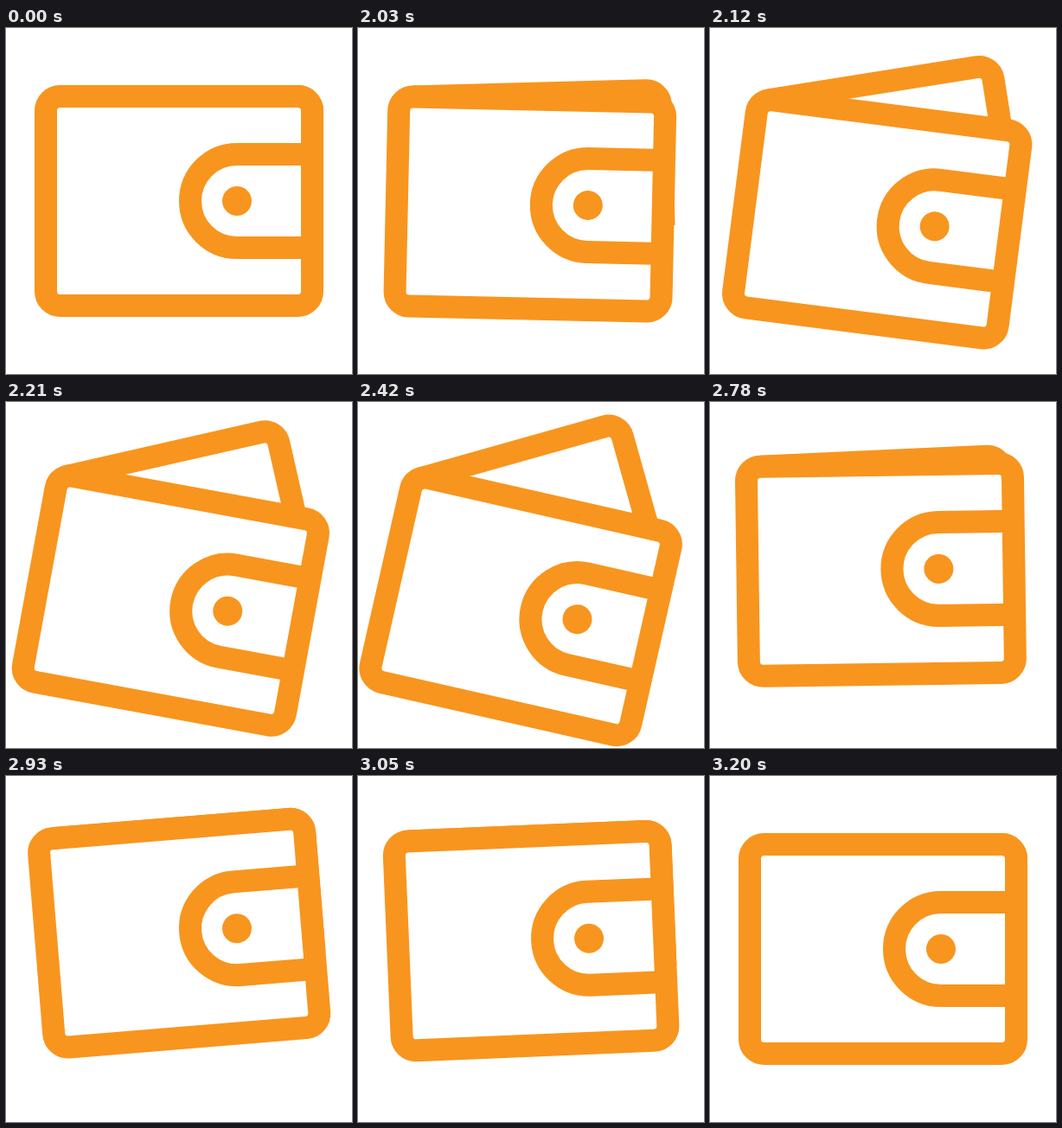
These frames come from a looping animation (400 px wide and 400 px high, 3260 ms). An HTML page:

```html
<!DOCTYPE html>
<html>
<head>
<meta charset="utf-8">
<style>
  html, body { margin: 0; width: 100%; height: 100%; overflow: hidden; background: #fff; }
  svg { display: block; width: 100%; height: 100%; }
</style>
</head>
<body>
<svg viewBox="0 0 400 400" fill="none" stroke="#f8951e" stroke-width="26">
  <g id="wallet">
    <path id="back"/>
    <rect x="46" y="79" width="308" height="242" rx="16.5" fill="#fff"/>
    <path d="M354 146H267a54 54 0 0 0 0 108H354"/>
    <circle cx="267" cy="200" r="17" fill="#f8951e" stroke="none"/>
  </g>
</svg>
<script>
const LOOP = 3260, HOLD = 2000, STEP = 30;
const wallet = document.getElementById('wallet');
const back = document.getElementById('back');

const progress = (k, from, to) => Math.min(1, Math.max(0, (k - from) / (to - from)));
const swing = (k, from, to) => (1 - Math.cos(Math.PI * progress(k, from, to))) / 2;
const mix = (a, b, p) => a + (b - a) * p;

// Cubic bezier easing, solved by bisection
function bezier(x1, y1, x2, y2) {
  const at = (a, b, s) => 3 * a * s * (1 - s) ** 2 + 3 * b * s * s * (1 - s) + s ** 3;
  return u => {
    let lo = 0, hi = 1;
    for (let i = 0; i < 24; i++) {
      const mid = (lo + hi) / 2;
      if (at(x1, x2, mid) < u) lo = mid; else hi = mid;
    }
    return at(y1, y2, hi);
  };
}
const openEase = bezier(.2, .25, .1, 1);

// Offset x, offset y, rotation
const OPEN = [-12.1, 37, 13];
const RECOIL = [.2, -18.8, -4.8];

function draw(time) {
  const k = Math.max(0, Math.floor((time % LOOP - HOLD) / STEP));
  const rise = k ? openEase(progress(k, 0, 18)) : 0;
  const fall = swing(k, 18.4, 29.5);
  const rest = 1 - swing(k, 30, 40);
  const [x, y, angle] = OPEN.map((v, i) => mix(v * rise, RECOIL[i], fall) * rest);
  wallet.setAttribute('transform', `translate(${x} ${y}) rotate(${angle} 200 200)`);

  const tilt = -29 * rise * (1 - swing(k, 18.7, 27.4));
  const width = 275 - 55 * rise * (1 - fall);
  back.setAttribute('d', `M62.5 79h${width}a16.5 16.5 0 0 1 16.5 16.5v140`);
  back.setAttribute('transform', `rotate(${tilt} 62.5 95.5)`);
}

const start = performance.now();
function tick() {
  draw(performance.now() - start);
  requestAnimationFrame(tick);
}
tick();
</script>
</body>
</html>
```
